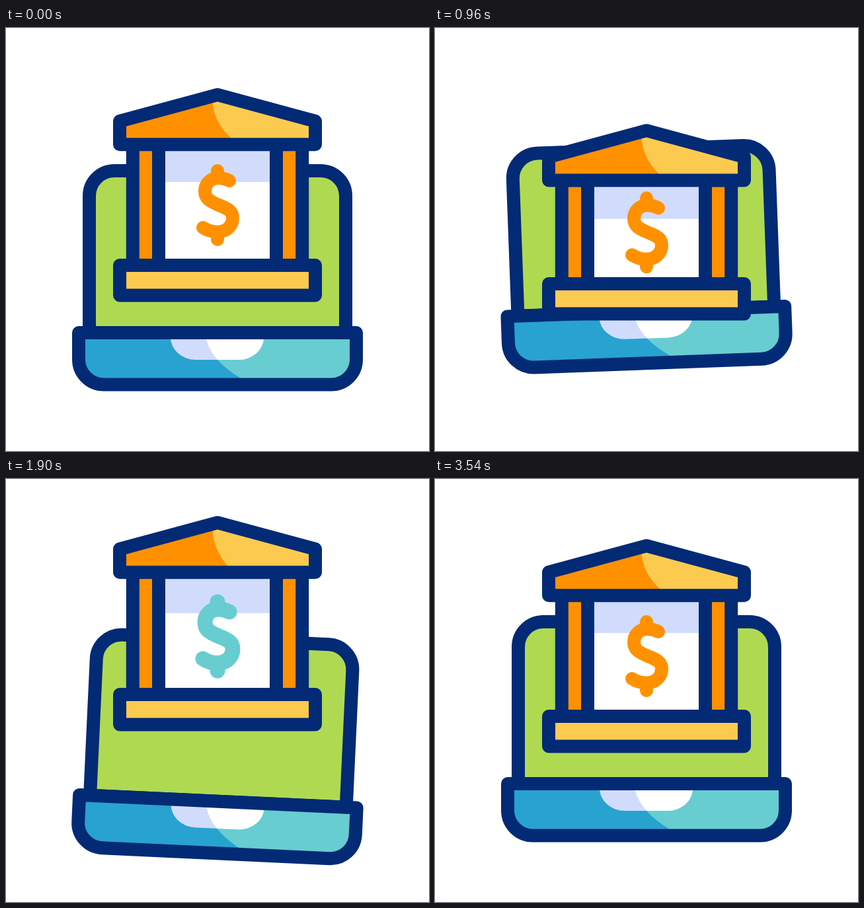
An HTML page with a canvas that plays this animation: 640x640 px, repeating every 3600 ms.

```html
<!DOCTYPE html>
<html lang="en">
<head>
<meta charset="utf-8">
<title>Online banking</title>
<style>
  html, body { margin: 0; width: 100%; height: 100%; overflow: hidden; background: #fff; }
  canvas { display: block; width: 100vw; height: 100vh; }
</style>
</head>
<body>
<canvas id="stage"></canvas>
<script>
const SIZE = 640, LOOP = 3600;
const NAVY = '#032a75', GREEN = '#b0d952', ORANGE = '#ff9100', YELLOW = '#fdca50';
const LILAC = '#d1dcfd', BLUE = '#28a2cf', TEAL = '#67cdd1', WHITE = '#fff';

const canvas = document.getElementById('stage');
const ctx = canvas.getContext('2d');
const ratio = window.devicePixelRatio || 1;
canvas.width = canvas.height = SIZE * ratio;

// Bank poses: roof, base and coin offsets, shade height, roof split shift
const REST = [0, 0, 0, 47, 0];
const LOW = [97, 57.4, 75.6, 47, 0];
const HIGH = [-35, -33, -30, 52, -5];

const bankKeys = [[260, REST], [590, LOW], [1565, HIGH], [3003, HIGH], [3500, REST]];
const liftKeys = [[260, [0]], [770, [-46]], [1552, [45]], [2430, [-7.3]], [3003, [-7.3]], [3500, [0]]];
const tiltKeys = [[260, [0]], [1060, [-2.2]], [1725, [3.05]], [2530, [0]]];
const tintKeys = [[1340, [0]], [1820, [1]], [2970, [1]], [3140, [0]]];

const screen = new Path2D('M126 461V254a38 38 0 0 1 38-38H476a38 38 0 0 1 38 38V461Z');
const deck = new Path2D('M110 461H530V501.5a38 38 0 0 1-38 38H148a38 38 0 0 1-38-38Z');
const notch = new Path2D('M249 461V468A38 34 0 0 0 287 502H352A38 34 0 0 0 390 468V461Z');
const deckLight = new Path2D('M298 461L303 471Q311 503.5 355 530L372 540H540V461Z');
const roof = new Path2D('M172 141L320 101L468 141V176.3H172Z');
const dollar = new Path2D(
  'M320 216V226 M320 310V320 M338 231C332 228 326 227 321 227' +
  'C309 227 301 236 301 247C301 258 308 262 322 268C337 273.5 343 278 343 287' +
  'C343 300 333 308.5 320 308.5C312 308.5 304 306 298 302');
const DOLLAR_LENGTH = 150;

const smooth = u => u * u * (3 - 2 * u);

function track(keys, t) {
  if (t <= keys[0][0]) return keys[0][1];
  for (let i = 1; i < keys.length; i++) {
    const [t0, a] = keys[i - 1], [t1, b] = keys[i];
    if (t < t1) {
      const k = smooth((t - t0) / (t1 - t0));
      return a.map((v, j) => v + (b[j] - v) * k);
    }
  }
  return keys[keys.length - 1][1];
}

function fill(path, color) {
  ctx.fillStyle = color;
  ctx.fill(path);
}

function stroke(path, color = NAVY, width = 20) {
  ctx.strokeStyle = color;
  ctx.lineWidth = width;
  ctx.stroke(path);
}

function box(x, y, w, h, color) {
  ctx.fillStyle = color;
  ctx.fillRect(x, y, w, h);
}

function shifted(dy, draw) {
  ctx.save();
  ctx.translate(0, dy);
  draw();
  ctx.restore();
}

function clipped(path, draw) {
  ctx.save();
  ctx.clip(path);
  draw();
  ctx.restore();
}

function drawLaptop(lift, tilt) {
  ctx.save();
  ctx.translate(320, 480 + lift);
  ctx.rotate(tilt * Math.PI / 180);
  ctx.translate(-320, -480);
  fill(screen, GREEN);
  stroke(screen);
  fill(deck, BLUE);
  clipped(deck, () => fill(deckLight, TEAL));
  fill(notch, LILAC);
  clipped(notch, () => fill(deckLight, WHITE));
  stroke(deck);
  ctx.restore();
}

function drawColumn(x, top, bottom) {
  const column = new Path2D();
  column.rect(x, top, 39.2, bottom - top);
  fill(column, ORANGE);
  stroke(column);
}

function drawRoof(split) {
  const light = new Path2D(
    `M312.5 100V111Q314 142 ${340 + split} 166L${348 + split} 176H470V100Z`);
  fill(roof, ORANGE);
  clipped(roof, () => fill(light, YELLOW));
  stroke(roof);
}

function drawBase() {
  const slab = new Path2D();
  slab.rect(172, 359, 296, 45.5);
  fill(slab, YELLOW);
  stroke(slab);
}

function drawDollar(tint) {
  stroke(dollar, ORANGE);
  if (tint <= 0) return;
  if (tint < 1) ctx.setLineDash([DOLLAR_LENGTH * tint, 999]);
  stroke(dollar, TEAL, 23);
  ctx.setLineDash([]);
}

function drawBank([roofY, baseY, coinY, shade, split], tint) {
  const top = 176 + roofY, bottom = 359 + baseY;
  box(231, top, 178, bottom - top, WHITE);
  box(231, top, 178, 10 + shade, LILAC);
  drawColumn(191.8, top, bottom);
  drawColumn(409, top, bottom);
  shifted(roofY, () => drawRoof(split));
  shifted(baseY, drawBase);
  shifted(coinY, () => drawDollar(tint));
}

function render(t) {
  ctx.setTransform(ratio, 0, 0, ratio, 0, 0);
  box(0, 0, SIZE, SIZE, WHITE);
  ctx.lineJoin = ctx.lineCap = 'round';
  drawLaptop(track(liftKeys, t)[0], track(tiltKeys, t)[0]);
  drawBank(track(bankKeys, t), track(tintKeys, t)[0]);
}

const start = performance.now();
function tick() {
  render((performance.now() - start) % LOOP);
  requestAnimationFrame(tick);
}
tick();
</script>
</body>
</html>
```
